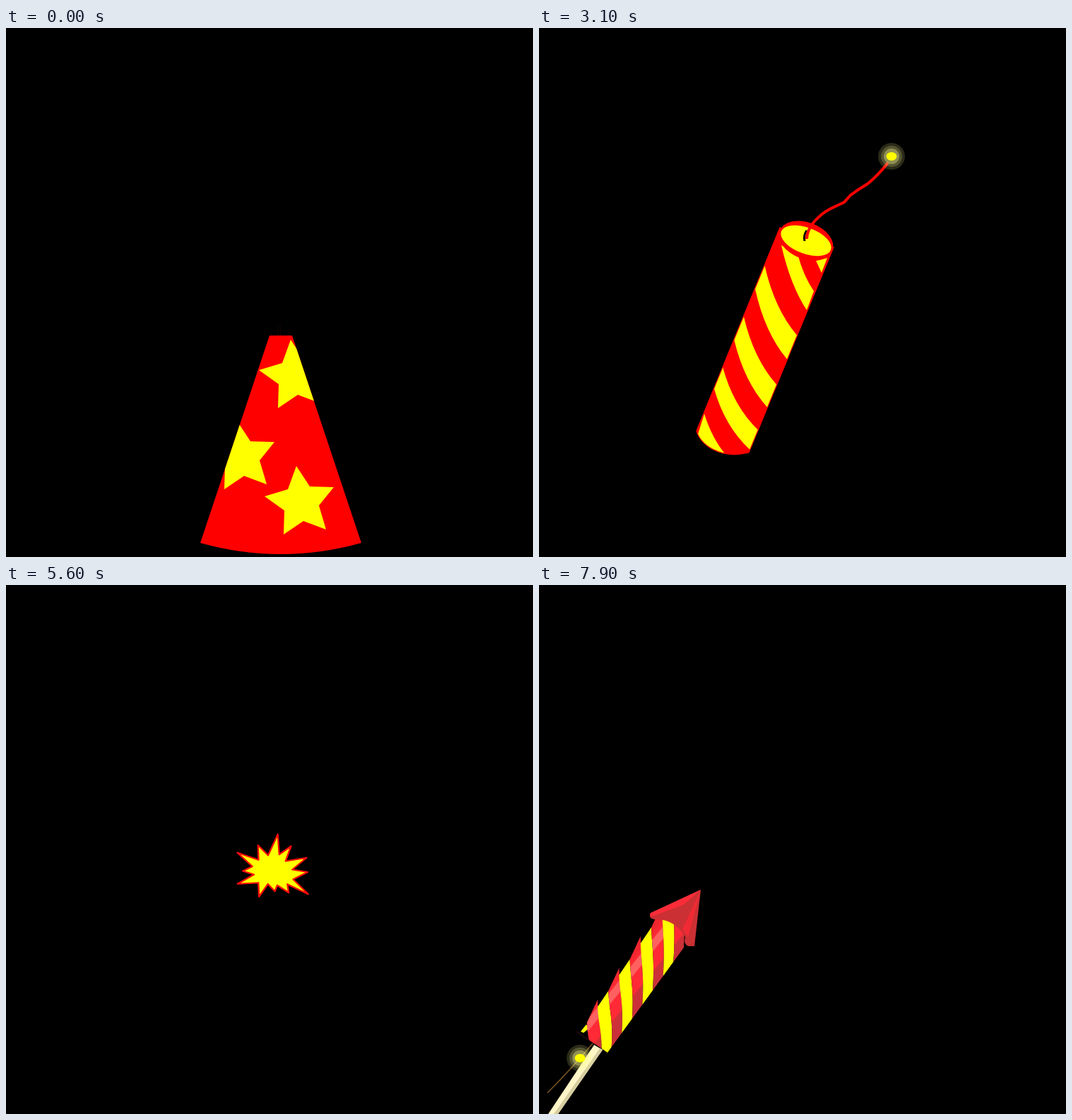
An HTML page with a canvas that plays this animation: 746 px wide and 750 px high, repeating every 8 s.

```html
<!DOCTYPE html>
<html lang="en">
<head>
<meta charset="utf-8">
<title>Fireworks</title>
<style>
  html, body { margin: 0; width: 100%; height: 100%; overflow: hidden; background: #000; }
  canvas { display: block; width: 746px; height: 750px; }
</style>
</head>
<body>
<canvas id="stage" width="746" height="750"></canvas>
<script>
const ctx = document.getElementById('stage').getContext('2d');
const LOOP = 8000;
const RED = '#f00', YELLOW = '#ff0', ORANGE = '#f60';

const fill = (d, color) => {
  ctx.fillStyle = color;
  ctx.fill(d instanceof Path2D ? d : new Path2D(d));
};
const stroke = (d, color, width) => {
  ctx.strokeStyle = color;
  ctx.lineWidth = width;
  ctx.stroke(d instanceof Path2D ? d : new Path2D(d));
};
const inside = (path, draw) => {
  ctx.save();
  ctx.clip(path);
  draw();
  ctx.restore();
};
const gradient = (x0, y0, x1, y1, stops) => {
  const g = ctx.createLinearGradient(x0, y0, x1, y1);
  stops.forEach(([at, color]) => g.addColorStop(at, color));
  return g;
};
// Number of 100 ms steps since a start time, limited to max.
const steps = (t, start, max) => Math.max(0, Math.min(max, Math.floor((t - start) / 100) + 1));

// ---- Fountain ----
const cone = new Path2D('M373 436H405L503 730Q389 762 275 730Z');
// Five-pointed star around its own centre.
const star = new Path2D('M-4-48 15-19 49-18 28 8 38 42 6 30-22 49-21 15-49-5-16-15Z');
const sparkStars = [
  [295, 32], [475, 64], [247, 168], [331, 215], [467, 176], [526, 204], [244, 299],
  [490, 295], [292, 371], [472, 395], [251, 443], [530, 447], [208, 601], [554, 661]
];

const drawStar = (x, y, scale, color) => {
  ctx.save();
  ctx.translate(x, y);
  ctx.scale(scale, scale);
  fill(star, color);
  ctx.restore();
};

const plume = makePlume();
const plumeColor = gradient(0, 437, 0, -185, [
  [0, '#ff2a00'], [.17, '#ff3300'], [.24, '#ff5a1a'], [.29, '#ff6633'], [.36, '#e06818'],
  [.48, '#a05810'], [.62, '#703c08'], [.8, '#401800'], [1, '#180400']
]);

function makePlume() {
  const cx = 387;
  const blades = new Path2D('M378 437Q384 220 387-60Q390 220 397 437Z');
  const lines = new Path2D();
  for (const side of [-1, 1]) {
    const x = offset => cx + side * offset;
    for (let k = 0; k < 8; k++) {
      const tip = (side < 0 ? 387 : 347) - 72 * k;
      const h = 437 - tip;
      const w = 33 - ((400 - tip) / 560) ** 2 * 20;
      const bend = w * (.5 + .2 * Math.min(1, h / 300));
      const thick = k < 3 ? 4 : 1.2;
      blades.addPath(new Path2D(
        `M${x(w)} ${tip}Q${x(bend)} ${tip + h * .55} ${x(9)} 430L${x(6)} 430` +
        `Q${x(bend - thick)} ${tip + h * .54} ${x(w)} ${tip}Z`));
    }
    for (let f = .1; f < 1; f += .14) {
      lines.addPath(new Path2D(
        `M${x(2 + f * 6)} 437Q${x(f * 28)} 200 ${x(f * 16)} ${f * 150 - 200}`));
    }
  }
  return { blades, lines };
}

function fountain(t) {
  const area = new Path2D();
  area.rect(340, 0, 95, 437);
  inside(area, () => {
    ctx.translate(0, 55 * (11 - steps(t, 100, 11)));
    fill(plume.blades, plumeColor);
    stroke(plume.lines, plumeColor, .8);
  });
  fill(cone, RED);
  inside(cone, () => {
    drawStar(407, 490, 1, YELLOW);
    drawStar(331, 605, 1, YELLOW);
    drawStar(415, 669, 1, YELLOW);
  });
  const lit = t >= 1600 && t < 2100 || t >= 2600;
  if (lit) sparkStars.forEach(([x, y]) => drawStar(x, y, .3, ORANGE));
}

// ---- Cracker ----
const tube = new Path2D('M341 283L223 571C228 590 255 612 297 602L417 311Z');
const leftX = y => 341 - (y - 285) * .4126;
const rightX = y => 417 - (y - 311) * .4124;

// Yellow stripe between left heights a, b and right heights c, d.
function stripe(a, b, c, d) {
  const ctrl = (l, r) =>
    [leftX(l) + (rightX(r) - leftX(l)) * .3, l + (r - l) * .62].join(' ');
  fill(`M${leftX(a)} ${a}Q${ctrl(a, c)} ${rightX(c)} ${c}L${rightX(d)} ${d}` +
       `Q${ctrl(b, d)} ${leftX(b)} ${b}Z`, YELLOW);
}

function lid(rx, ry, color) {
  ctx.beginPath();
  ctx.ellipse(378, 301.5, rx, ry, .36, 0, 7);
  ctx.fillStyle = color;
  ctx.fill();
}

function glow(x, y) {
  const rings = [[19, .17], [15, .2], [11, .35]];
  rings.forEach(([r, alpha]) => {
    ctx.beginPath();
    ctx.arc(x, y, r, 0, 7);
    ctx.fillStyle = `rgba(255,255,150,${alpha})`;
    ctx.fill();
  });
  ctx.beginPath();
  ctx.ellipse(x, y, 7.5, 6, 0, 0, 7);
  ctx.fillStyle = YELLOW;
  ctx.fill();
}

function zigzag(x0, y0, x1, y1) {
  const dx = x1 - x0, dy = y1 - y0, len = Math.hypot(dx, dy);
  const count = Math.round(len / 9.3);
  let d = `M${x0} ${y0}`;
  for (let i = 1; i < count; i++) {
    const k = i / count, amp = i % 2 ? 5.5 : -5.5;
    d += `L${x0 + dx * k - dy / len * amp} ${y0 + dy * k + dx / len * amp}`;
  }
  return d + `L${x1} ${y1}`;
}
const bolts = new Path2D([
  [385, 254, 302, 209], [387, 244, 347, 171], [393, 233, 406, 150], [403, 233, 460, 167],
  [405, 246, 506, 229], [406, 265, 493, 272], [402, 278, 512, 310], [420, 301, 461, 352]
].map(b => zigzag(...b)).join(''));

const dust = (() => {
  let seed = 7;
  const random = () => (seed = seed * 16807 % 2147483647) / 2147483647;
  const path = new Path2D();
  for (let i = 0; i < 330; i++) {
    const a = -3.2 + random() * 4.4, r = 64 + 50 * Math.sqrt(random());
    path.rect(Math.round(406 + r * Math.cos(a)), Math.round(260 + r * Math.sin(a)),
      1 + Math.round(random()), 1);
  }
  return path;
})();

function cracker(t) {
  fill(tube, RED);
  inside(tube, () => {
    stripe(337, 370, 436, 470);
    stripe(409, 442, 506, 538);
    stripe(481, 511, 570, 598);
    fill('M343 308Q356 365 379 400L389 373Q374 351 366 320Z', YELLOW);
    fill('M392 330L408 326 400 347Z', YELLOW);
    fill('M234 547Q246 585 267 608L215 608Z', YELLOW);
  });
  stroke(tube, RED, 1.2);
  lid(40, 26, RED);
  lid(37.5, 18.5, YELLOW);
  if (t < 4600) {
    stroke('M376 302Q374 294 379 287', '#000', 3);
    stroke('M379 299Q379 287 390 274Q401 262 413 256L432 247 441 237Q453 228 465 221Q480 209 494 191', RED, 4);
    const n = steps(t, 3600, 10);
    glow(499 - 8.55 * n, 182 + 7.44 * n);
  } else {
    stroke('M377 302Q376 291 388 282Q402 270 396 256L392 254', '#c81010', 4);
    fill(dust, '#b4a276');
    stroke(bolts, '#f84000', 5);
    stroke(bolts, '#ffb000', 3);
  }
}

// ---- Burst ----
const burstShape = new Path2D(`M405 214 413 328 480 281 449 366 568 347 487 414 574 428
  492 469 577 553 459 497 467 545 402 503 388 537 349 496 299 567 295 489 177 495
  270 442 207 422 261 396 176 318 296 359 293 276 350 333Z`);

function burst(t) {
  const s = steps(t, 5600, 4) / 4;
  ctx.save();
  ctx.translate(378, 400);
  ctx.scale(s, s);
  ctx.translate(-378, -400);
  ctx.lineJoin = 'round';
  fill(burstShape, YELLOW);
  stroke(burstShape, RED, 9);
  stroke(burstShape, '#ff4a4a', 1.2);
  ctx.restore();
}

// ---- Rocket ----
const bandRed = gradient(112, 550, 154, 584, [
  [0, '#f0262e'], [.14, '#ff2a35'], [.16, '#ff6060'], [.34, '#ff6060'], [.36, '#ff2a35'],
  [.66, '#ff2a35'], [.7, '#d03038'], [1, '#c83038']
]);
const body = new Path2D('M40 600L160 465 180 465 210 500 206 513 97 663 71 645Z');

function bands() {
  const top = i => [83 + 15.2 * i, 598 - 22.5 * i];
  const end = i => [88 + 14.6 * i, 676 - 20.2 * i];
  for (let i = -1; i < 8; i++) {
    const red = i % 2 !== 0;
    const [ax, ay] = top(i), [bx, by] = top(i + 1);
    const [cx, cy] = end(i), [dx, dy] = end(i + 1);
    const lift = red ? 10 : 0;
    fill(`M${ax} ${ay}C${ax + 1} ${ay + 28} ${cx + 3} ${cy - 40} ${cx} ${cy}L${dx} ${dy}` +
         `C${dx + 3} ${dy - 40} ${bx + 1} ${by + 28} ${bx} ${by - lift}Z`,
         red ? bandRed : YELLOW);
  }
}

function rocket(t) {
  stroke('M12 720Q44 688 76 650', '#7a5420', 1.6);
  fill('M78 652L90 659 27 750H13Z', '#fff6c8');
  fill('M86 657L90 659 27 750H21Z', '#d6cda0');
  fill('M59 633L67 623 70 629 63 635Z', YELLOW);
  stroke('M53 633L80 652', '#4a1010', 1);
  inside(body, bands);
  fill('M229 432L158 465Q154 472 163 474Q192 473 207 499Q204 509 211 512L220 512Z', '#cb3034');
  fill('M229 432L158 465Q155 468 160 470L205 453Z', '#fb2c38');
  fill('M229 432L203 488 211 499Z', '#f02a34');
  const k = .072 * (steps(t, 6900, 11) - 1), m = 1 - k;
  glow(m * m * 12 + 2 * m * k * 44 + k * k * 76, m * m * 720 + 2 * m * k * 688 + k * k * 650);
}

function frame() {
  const t = performance.now() % LOOP;
  ctx.fillStyle = '#000';
  ctx.fillRect(0, 0, 746, 750);
  const scene = t < 3100 ? fountain : t < 5600 ? cracker : t < 6900 ? burst : rocket;
  scene(t);
  requestAnimationFrame(frame);
}
frame();
</script>
</body>
</html>
```
